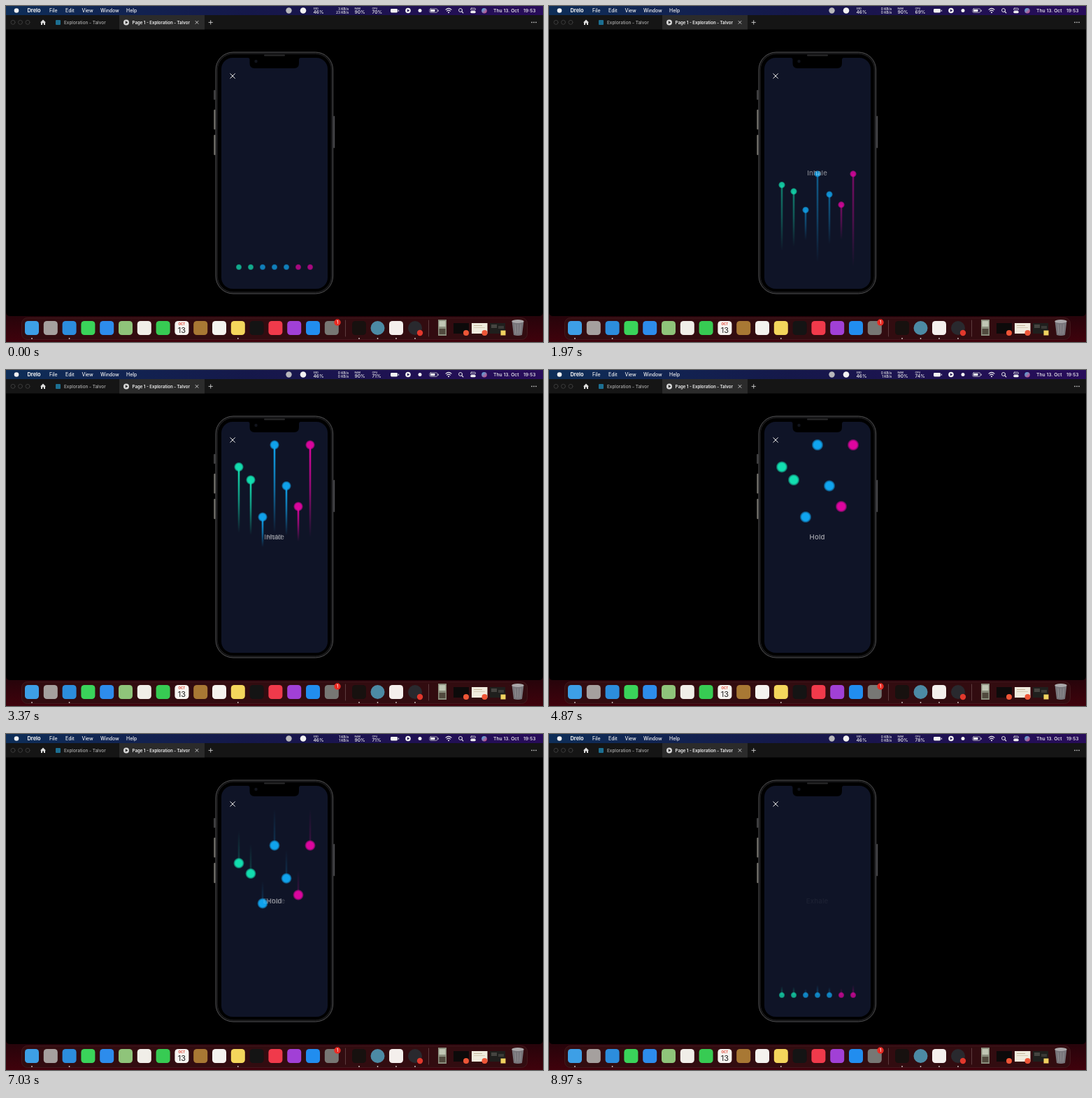
Recreate the animation shown at these times as an HTML page. Size 768x480 px, loop 9.01 s.

```html
<!DOCTYPE html>
<html lang="en">
<head>
<meta charset="utf-8">
<title>Breathing exercise</title>
<style>
html, body { margin: 0; width: 100%; height: 100%; overflow: hidden; background: #000; }
svg { display: block; width: 768px; height: 480px; font-family: Inter, Roboto, sans-serif; }
.line { fill: none; stroke-linecap: round; }
</style>
</head>
<body>
<svg id="stage" viewBox="0 0 768 480">
  <defs>
    <linearGradient id="menu"><stop stop-color="#0e2e58"/><stop offset=".45" stop-color="#15184a"/><stop offset="1" stop-color="#280c5a"/></linearGradient>
    <linearGradient id="wall" x2="0" y2="1"><stop stop-color="#22040a"/><stop offset="1" stop-color="#40020c"/></linearGradient>
    <linearGradient id="siri" x2="1" y2="1"><stop stop-color="#3fb7e8"/><stop offset="1" stop-color="#d6407c"/></linearGradient>
  </defs>

  <rect y="436" width="768" height="44" fill="url(#wall)"/>
  <path d="M0 13H768V437Q768 443 762 443H6Q0 443 0 437Z" fill="#000"/>
  <rect width="768" height="13" fill="url(#menu)"/>

  <g id="tabs">
    <rect y="13" width="768" height="20.5" fill="#151515"/>
    <rect x="162" y="13" width="122" height="20.5" fill="#2b2b2b"/>
    <g class="line" stroke="#3a3a3a">
      <circle cx="10" cy="23.3" r="3"/><circle cx="20.5" cy="23.3" r="3"/><circle cx="31" cy="23.3" r="3"/>
    </g>
    <path d="M49 23.4L53 19.5L57 23.4H56V27H54V24.5H52V27H50V23.4Z" fill="#dcdcdc"/>
    <rect x="71" y="20" width="7" height="7" rx="1" fill="#1c6f92"/>
    <circle cx="172" cy="23.4" r="4" fill="#d6d6d6"/>
    <path d="M170.9 21.3L174.4 23.4L170.9 25.5Z" fill="#2b2b2b"/>
    <g class="line" stroke="#d2d2d2" stroke-width=".9">
      <path d="M271 21.4L275 25.4M275 21.4L271 25.4M290 23.4H295.4M292.7 20.7V26.1"/>
    </g>
    <g fill="#d2d2d2"><circle cx="752" cy="23.4" r=".8"/><circle cx="755" cy="23.4" r=".8"/><circle cx="758" cy="23.4" r=".8"/></g>
  </g>

  <g id="status" fill="#f2f2f2">
    <circle cx="15" cy="6.5" r="3.3"/>
    <circle cx="404.5" cy="6.5" r="4.2" fill="#b8b8bc"/>
    <circle cx="425" cy="6.5" r="4.3"/>
    <rect x="550" y="4" width="10" height="5.4" rx="1.4"/>
    <rect x="561" y="5.6" width="1" height="2.2"/>
    <circle cx="575" cy="6.5" r="3.8"/>
    <path d="M573.9 4.5L577.2 6.5L573.9 8.5Z" fill="#1f1252"/>
    <circle cx="592" cy="6.5" r="2.5"/>
    <rect x="605.9" y="3.9" width="11" height="5.4" rx="1.5" class="line" stroke="#ddd" stroke-width=".7"/>
    <rect x="607" y="5" width="6.5" height="3.2" rx=".6"/>
    <rect x="617.6" y="5.6" width="1" height="2.2"/>
    <g class="line" stroke="#f2f2f2" stroke-width="1.1">
      <path d="M629 5.2Q633 1.6 637 5.2M630.6 7.2Q633 5.1 635.4 7.2"/>
      <circle cx="650" cy="6" r="2.5" stroke-width=".9"/><path d="M652 8L653.8 9.8"/>
      <rect x="664.5" y="3.2" width="7" height="2.6" rx="1.3" stroke-width=".8"/>
    </g>
    <circle cx="633" cy="9.3" r="1"/>
    <rect x="664.2" y="7" width="7.6" height="3.2" rx="1.6"/>
    <circle cx="684" cy="6.7" r="3.8" fill="url(#siri)"/>
  </g>

  <g id="phone">
    <g fill="#77756f">
      <rect x="297" y="120" width="2.5" height="14" rx="1" fill="#3e3e40"/>
      <rect x="297.3" y="148" width="2.2" height="28.5" rx="1"/><rect x="297.3" y="184" width="2.2" height="29" rx="1"/>
      <rect x="468.4" y="157" width="1.8" height="46" rx=".9" fill="#4e4e50"/>
    </g>
    <rect x="300" y="66" width="167.6" height="345" rx="25" fill="#121213" stroke="#505052"/>
    <rect x="302.3" y="68.3" width="163" height="340.4" rx="22.8" fill="#000" stroke="#29292b" stroke-width=".7"/>
    <rect x="308" y="74" width="152" height="330" rx="16" fill="#0f1427"/>
    <path d="M346 74Q348.5 74 348.5 77V82Q348.5 89 355.5 89H412Q419 89 419 82V77Q419 74 421.5 74Z" fill="#000"/>
    <rect x="369" y="69.6" width="30" height="1.8" rx=".9" fill="#2a2a2c"/>
    <circle cx="357.5" cy="79" r="2.2" fill="#12141c"/>
    <path class="line" d="M320.8 96.7L327.4 103.3M327.4 96.7L320.8 103.3" stroke="#f2f2f2"/>
  </g>

  <g id="dots"></g>
  <g id="words"></g>

  <g id="dock">
    <rect x="22.5" y="445.5" width="723" height="31" rx="8" fill="#320c10" stroke="#4a2024" stroke-width=".7"/>
    <path class="line" d="M485.5 449V472M604.5 449V472" stroke="#69484a" stroke-width=".8"/>
  </g>
</svg>
<script>
const NS = 'http://www.w3.org/2000/svg';
const LOOP = 9010;
const $ = id => document.getElementById(id);

function add(parent, tag, attrs, text) {
  const node = document.createElementNS(NS, tag);
  set(node, attrs);
  if (text !== undefined) node.textContent = text;
  parent.append(node);
  return node;
}
function set(node, attrs) {
  for (const name in attrs) node.setAttribute(name, attrs[name]);
}
function label(parent, text, x, y, size, weight = 500, fill = '#f2f2f2', anchor = 'start') {
  return add(parent, 'text', {
    x, y, fill, 'font-size': size, 'font-weight': weight, 'text-anchor': anchor
  }, text);
}

// Menu bar and tabs
const bar = $('status');
label(bar, 'Drelo', 30.5, 9, 7.4, 700);
[['File', 62], ['Edit', 85], ['View', 108.5], ['Window', 135], ['Help', 172]]
  .forEach(([text, x]) => label(bar, text, x, 9, 6.9));
label(bar, 'Thu 13. Oct', 697, 9, 6.8);
label(bar, '19:53', 740, 9, 6.8);
[['SSD', 439.5], ['RAM', 498.5], ['CPU', 523.5]]
  .forEach(([text, x]) => label(bar, text, x, 5.1, 3.7));
label(bar, '46%', 439.5, 11, 6.6);
label(bar, '90%', 498.5, 11, 6.6);
const cpu = label(bar, '', 523.5, 11, 6.6);
const up = label(bar, '', 490, 5.6, 4.8, 500, '#f2f2f2', 'end');
const down = label(bar, '', 490, 11, 4.8, 500, '#f2f2f2', 'end');
label($('tabs'), 'Exploration - Talvor', 83, 25.6, 6.4, 500, '#acacac');
label($('tabs'), 'Page 1 - Exploration - Talvor', 180.5, 25.6, 6.1, 600, '#f2f2f2');

// Dock
const dock = $('dock');
const tile = (x, fill) =>
  add(dock, 'rect', { x: x - 10, y: 450, width: 20, height: 20, rx: 4.6, fill });
const disc = (cx, cy, r, fill) => add(dock, 'circle', { cx, cy, r, fill });
const box = (x, y, width, height, fill) => add(dock, 'rect', { x, y, width, height, fill });

['#3d9fe6', '#a5a09e', '#2c8ddd', '#3ad45a', '#2d8cec', '#8fc47a', '#f0eee8', '#37cb53',
 '#f6f4f0', '#a87834', '#f4f2ee', '#f4d65c', '#141414', '#f03a4b', '#a140d6', '#218def', '#777774']
  .forEach((fill, i) => tile(37 + i * 26.8, fill));
label(dock, 'OCT', 251.4, 455.6, 4.4, 700, '#e0402f', 'middle');
label(dock, '13', 251.4, 466.5, 11, 400, '#222', 'middle');
disc(474, 452, 4.7, '#e92b23');
label(dock, '1', 474, 454.3, 6, 500, '#fff', 'middle');
tile(505, '#17110f');
disc(531.5, 460, 10, '#4c8aa4');
tile(558, '#f4efec');
disc(585, 460, 10, '#29292e');
disc(592, 467, 4.2, '#e2382c');
box(618, 448, 12, 23, '#8b8e7d');
box(619.5, 450, 9, 8, '#c0c6b4');
box(619.5, 461, 9, 8, '#514a3e');
box(640, 453, 22, 15, '#0c0a0a');
box(666, 453, 22.5, 15, '#f0ebdd');
box(669, 456, 12, 1, '#c4b79c');
box(669, 459, 16, 1, '#d6cbb4');
box(692, 453, 22, 15, '#1f1f1d');
box(694, 455, 8, 5, '#454440');
box(704, 457, 8, 4, '#3a3936');
disc(658, 467, 4, '#ee5637');
disc(684.5, 467, 4, '#ee5637');
box(707.5, 463.5, 7, 7, '#f0d260');
add(dock, 'path', { d: 'M723.5 450H740.5L738 470Q732 472 726 470Z', fill: '#77757a' });
add(dock, 'ellipse', { cx: 732, cy: 450.5, rx: 8.6, ry: 2.4, fill: '#aaa8aa' });
add(dock, 'path', { class: 'line', d: 'M728 455L729 468M732 455V468M736 455L735 468', stroke: '#989698', 'stroke-width': .8 });
[37, 90.6, 331.8, 505, 531.5, 558, 585].forEach(x => disc(x, 475, .9, '#d8c8c8'));

// Soft dots and their trails
const FLOOR = 373;
const COLORS = { green: '#12dfb0', blue: '#10a4ee', pink: '#dd059f' };
const defs = document.querySelector('defs');
function stops(gradient, color, list) {
  list.forEach(([offset, alpha]) =>
    add(gradient, 'stop', { offset, 'stop-color': color, 'stop-opacity': alpha }));
}
for (const name in COLORS) {
  const color = COLORS[name];
  stops(add(defs, 'radialGradient', { id: name }), color, [[0, 1], [.62, 1], [.8, .65], [1, 0]]);
  stops(add(defs, 'linearGradient', { id: name + 'Rise', x2: 0, y2: 1 }), color, [[0, 1], [.5, .6], [1, 0]]);
  stops(add(defs, 'linearGradient', { id: name + 'Fall', x2: 0, y2: 1 }), color, [[0, 0], [.5, .55], [1, 1]]);
}
// x, resting height at the top, trail length when fully risen
const dots = [
  ['green', 333, 138.5, 188], ['green', 350, 157, 158], ['blue', 367, 210, 86], ['blue', 384, 107, 252],
  ['blue', 401, 165.5, 142], ['pink', 418, 195, 100], ['pink', 435, 107, 264]
].map(([name, x, home, length]) => ({
  name, home, length,
  trail: add($('dots'), 'rect', { x: x - 1.3, width: 2.6 }),
  ball: add($('dots'), 'circle', { cx: x, fill: `url(#${name})` })
}));

const [inhale, hold, exhale] = ['Inhale', 'Hold', 'Exhale'].map(text => {
  const node = label($('words'), text, 383.6, 242.2, 9.6, 500, '#f4f4f4', 'middle');
  node.setAttribute('letter-spacing', .2);
  return node;
});

// ms, kilobytes up, kilobytes down, processor load
const METER = [[0, 3, 23, 70], [600, 0, 0, 69], [2900, 0, 0, 71], [4600, 0, 1, 74], [6200, 1, 1, 71], [8200, 0, 0, 78]];

// Gentle ease in and out, cubic-bezier(.3, .15, .7, .85)
function ease(u) {
  u = Math.min(1, Math.max(0, u));
  const curve = (s, a, b) => 3 * s * (1 - s) * ((1 - s) * a + s * b) + s ** 3;
  let lo = 0, hi = 1;
  for (let i = 0; i < 24; i++) {
    const mid = (lo + hi) / 2;
    if (curve(mid, .3, .7) < u) lo = mid; else hi = mid;
  }
  return curve(lo, .15, .85);
}

function draw(t) {
  // Four moves: low, risen, held, fallen and back to low
  const move = (from, to) => ease((t - from) / (to - from));
  const rise = move(970, 2970);
  const settle = move(2970, 3770);
  const fall = move(6555, 8550);
  const clear = move(8550, LOOP);
  const mix = (low, risen, held, fallen) =>
    low + (risen - low) * rise + (held - risen) * settle + (fallen - held) * fall + (low - fallen) * clear;

  const r = mix(4, 4.9, 7.5, 4.8) * 1.14;
  const glow = mix(.74, .95, 1, .95);
  const falling = fall > 0;

  for (const { name, home, length, trail, ball } of dots) {
    const travel = FLOOR - home;
    const y = FLOOR - travel * (rise - fall);
    const tail = falling ? home + travel * clear : y + length * rise * (1 - settle);
    set(ball, { cy: y, r, opacity: glow });
    set(trail, {
      y: Math.min(y, tail),
      height: Math.abs(y - tail),
      opacity: falling ? fall * (1 - clear * .7) : rise,
      fill: `url(#${name}${falling ? 'Fall' : 'Rise'})`
    });
  }
  set(inhale, { opacity: rise * (1 - settle) });
  set(hold, { opacity: .68 * settle * (1 - fall) });
  set(exhale, { opacity: fall * (1 - clear) });

  const [, sent, received, load] = METER.filter(row => row[0] <= t).pop();
  up.textContent = sent + ' KB/s';
  down.textContent = received + ' KB/s';
  cpu.textContent = load + '%';
}

const start = performance.now();
function tick() {
  draw((performance.now() - start) % LOOP);
  requestAnimationFrame(tick);
}
tick();
</script>
</body>
</html>
```
